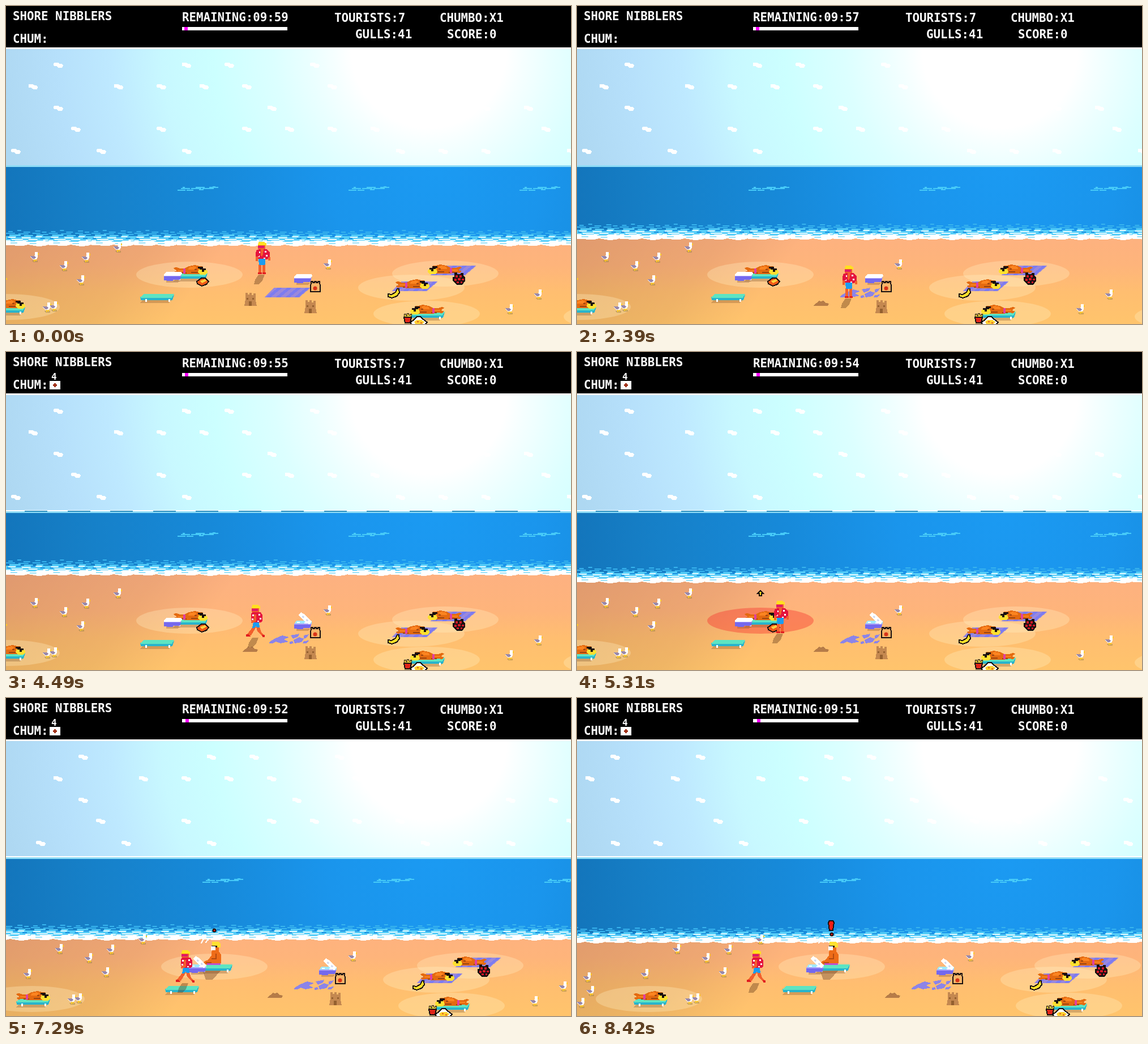
Recreate the animation shown at these times as an HTML page. Size 998 by 561 pixels, loop 8470 ms.

```html
<!DOCTYPE html>
<html lang="en">
<head>
<meta charset="utf-8">
<title>Shore game</title>
<style>
html, body { margin: 0; width: 100%; height: 100%; overflow: hidden; background: #000; }
svg { display: block; width: 100vw; height: 100vh; shape-rendering: crispEdges; }
text { font: bold 20.8px "DejaVu Sans Mono", monospace; fill: #fff; white-space: pre; }
.round { shape-rendering: auto; }
</style>
</head>
<body>
<svg viewBox="0 0 998 561">
<defs>
  <radialGradient id="skyFill" gradientUnits="userSpaceOnUse" cx="747" cy="78" r="760">
    <stop offset=".18" stop-color="#fff"/><stop offset=".22" stop-color="#f6ffff"/>
    <stop offset=".28" stop-color="#eaffff"/><stop offset=".36" stop-color="#dcffff"/>
    <stop offset=".5" stop-color="#cff"/><stop offset=".62" stop-color="#c8f8ff"/>
    <stop offset=".74" stop-color="#bee9ff"/><stop offset=".86" stop-color="#b6e0fb"/>
    <stop offset="1" stop-color="#aed8f2"/>
  </radialGradient>
  <radialGradient id="seaFill" gradientUnits="userSpaceOnUse" cx="760" cy="290" r="770">
    <stop offset="0" stop-color="#1b9af2"/><stop offset=".25" stop-color="#1a95ec"/>
    <stop offset=".5" stop-color="#178ada"/><stop offset=".8" stop-color="#1680c8"/>
    <stop offset="1" stop-color="#1375bb"/>
  </radialGradient>
  <linearGradient id="sandFill" gradientUnits="userSpaceOnUse" x1="0" y1="400" x2="0" y2="561">
    <stop offset="0" stop-color="#fdb180"/><stop offset=".35" stop-color="#feb47b"/>
    <stop offset=".65" stop-color="#ffbe70"/><stop offset="1" stop-color="#ffc46c"/>
  </linearGradient>
  <linearGradient id="shade" gradientUnits="userSpaceOnUse" x1="0" y1="410" x2="260" y2="600">
    <stop offset="0" stop-color="#200" stop-opacity=".13"/>
    <stop offset=".65" stop-color="#200" stop-opacity=".07"/>
    <stop offset="1" stop-color="#200" stop-opacity="0"/>
  </linearGradient>
  <pattern id="foamTile" patternUnits="userSpaceOnUse" width="75.5" height="32">
    <path fill="#38b4ee" d="M4 2h8v2H4zM20 0h7v2h-7zM31 3h12v2H31zM52 1h9v2h-9zM64 3h8v2h-8zM0 5h16v2H0zM22 6h18v2H22zM47 5h14v2H47zM66 7h9v2h-9z"/>
    <path fill="#55cdf8" d="M6 8h20v3H6zM32 9h16v2H32zM54 8h12v3H54zM0 11h75.5v12H0z"/>
    <path fill="#1b8fe0" d="M18 11h9v2h-9zM44 11h8v2h-8zM2 14h6v2H2zM61 14h8v2h-8z"/>
    <path fill="#e4faff" d="M4 12h13v2H4zM28 13h16v2H28zM53 11h11v2H53zM10 16h20v2H10zM40 16h16v2H40zM66 17h9v2h-9zM0 18h8v2H0zM30 18h9v2h-9z"/>
    <path fill="#fff" d="M0 20h14l4-1h14l5 2h14l5-2h12l4 1h3.5v6l-6 2-12 1-7-1-12-2-7 2H20l-8-1H0z"/>
    <path fill="#9be2f8" d="M8 22h12v2H8zM42 23h12v2H42z"/>
  </pattern>
  <path id="cloud" fill="#fff" d="M-7-5h7l3 2h3l3 3-2 4h-6l-4-3h-4l-1-3z"/>
  <path id="ripple" fill="#46caf8" d="M-36 2h14v2h-14zM-30-1h16v2h-16zM-27-3h4v2h-4zM-20 2h12v2h-12zM-12-1h18v2h-18zM-4-3h16v2H-4zM2 1h8v2H2zM8-1h20v2H8zM20-3h16v2H20zM26-4h5v1h-5z"/>
  <g id="gull">
    <path fill="#a88a48" opacity=".6" d="M-4 6h10v3H-2z"/>
    <path fill="#fff" d="M1-9h5v9l-2 4h-7l-4-5h5l3-3z"/>
    <path fill="#98a" d="M-7-2h8l2 3-3 2h-3z"/>
    <path fill="#fc2" d="M6-7h2v3H6zM-1 4h2v4h-2zM2 4h2v3H2z"/>
  </g>
  <g id="bed">
    <path fill="#8a5a30" opacity=".35" d="M-26 9h52l-6 5h-50z"/>
    <path fill="#28b4cc" d="M-30 3l60-3-3 9h-56z"/>
    <path fill="#5ee4c2" d="M-24-2h54l-4 7h-56z"/>
    <path fill="#fff" d="M-21 7h3v5h-3zM20 7h3v5h-3z"/>
  </g>
  <g id="towel">
    <path fill="#9a88dc" d="M-23-9h64l-20 17h-62z"/>
    <path fill="#7c7cf0" d="M-17-9h8l-21 17h-8zM0-9h8L-13 8h-8zM17-9h8L4 8h-8zM33-9h6L19 8h-7z"/>
  </g>
  <path id="rags" fill="#8c84e8" d="M-33 5l8-5 14-6 12 3-9 4 8 4-14 3-8-3-6 3h-6zM4-6l15-3-2 5-9 4zM9 2l10-5 8 3-4 6-12 2zM27-6l9-2-4 6-5 2zM27 4l9-1-5 5h-6zM2 5l5-1 2 4-7 1z"/>
  <g id="lying">
    <path fill="#e46a10" d="M-30-4l6-1 6 2h8l8-4 11-2 8 2h5v14h-30l-11-2-6 1-4-3 6-2z"/>
    <path fill="#fb8420" d="M-2-5l9-2 5 2-5 4H-3zM-22 0h12v2h-12z"/>
    <path fill="#9c4510" d="M2 3h12v2H2zM-16 4h10v2h-10zM8-2h4v2H8z"/>
    <path fill="#e040a0" d="M-12-3h4v9h-4z"/>
    <path fill="#ffe030" d="M16-2h12l3 4v3l-4 3h-9l-4-4z"/>
    <path fill="#181010" d="M14-6h9v3h5v3h-3v3h-4v-4h-4v-2h-3z"/>
  </g>
  <g id="sitting">
    <path fill="#6b3a18" opacity=".4" d="M-22 16h32l-14 16h-12z"/>
    <path fill="#ee6c18" d="M-5-25H7v7l4 6v15l-6 3h-20l-9-1 6-6 6-2 6-8z"/>
    <path fill="#b44a10" d="M1-14h2v10h-9v-2h7zM-16 1h10v2h-10z"/>
    <path fill="#c050d0" d="M-14 3h24v3h-24z"/>
    <path fill="#ffe030" d="M-5-35H6l4 4v6H-2l-3-5z"/>
    <path fill="#181010" d="M-6-28h10v3H-6z"/>
  </g>
  <g id="coolerBox">
    <path fill="#8a5a30" opacity=".35" d="M-12 7h26l-6 4h-20z"/>
    <path fill="#7468ee" d="M-16-2h31l-3 8H0v2h-11V7h-5z"/>
    <path fill="#a8a0fa" d="M-16-2h31l-2 2h-29z"/>
  </g>
  <path id="shut" fill="#fff" d="M-12-8h27l1 3-3 4h-29v-3z"/>
  <g id="open">
    <path fill="#9fe8ff" d="M-12-7h27v5h-30z"/>
    <path fill="#fff" d="M-9-17l5-5 5 3 14 13-3 5-6-1zM-11-5h5v2h-5zM2-4h6v2H2z"/>
    <path fill="#cfd8f0" d="M-3-14l3-2 2 3-2 1zM4-8l3-2 2 3-3 1z"/>
  </g>
  <g id="castle">
    <path fill="#c48850" d="M-8-12h4v3h3v-3h4v4h3v-3h4v12l2 10h-22l2-12z"/>
    <path fill="#94602f" d="M-2 3h5v8h-5zM-6-3h3v3h-3zM4-3h3v3H4z"/>
  </g>
  <path id="pile" fill="#b67c48" d="M-14 6l6-5 4-4 4 1 4-1 5 4 5 1-2 4z"/>
  <g id="snack" stroke="#181010" stroke-width="2">
    <path fill="#f05a18" d="M-10 0l8-6h7l6 6-4 5-8 3-8-4z"/>
    <path fill="#ffd040" d="M-5-1l9-3 3 3-8 4z" stroke="none"/>
  </g>
  <g id="berries">
    <path fill="#181010" d="M-8-11h5v3h6v-2h5v5l3 3v6l-5 7H-4l-7-7v-7h3z"/>
    <path fill="#d81828" d="M-6-6h4v4h-4zM1-6h4v4H1zM-8 0h4v4h-4zM-2-1h5v4h-5zM5 0h4v3H5zM-4 5h4v3h-4zM3 5h3v3H3z"/>
  </g>
  <path id="banana" fill="#ffe028" stroke="#181010" stroke-width="2" d="M6-8h3l1 7-5 6-8 3-7-2v-5l6 1 7-4z"/>
  <g id="fries">
    <path fill="#ffe040" stroke="#181010" d="M-6-8h3v3h2v-4h3v3h3v-2h3l-2 9H-5z"/>
    <path fill="#e02418" stroke="#181010" stroke-width="2" d="M-6-2H7L5 8H-4z"/>
  </g>
  <g id="pie">
    <path fill="#fff" stroke="#181010" stroke-width="2" d="M-15 2l8-7 4-4h6l4 4 8 6-6 6h-18z"/>
    <path fill="#ffd030" d="M-8 0l5-3H5l5 3-4 5H-5z"/>
    <path fill="#e06020" d="M-3-1h3v2h-3zM3 1h3v2H3z"/>
  </g>
  <g id="bag">
    <path fill="#f6b468" stroke="#181010" stroke-width="2" d="M-7-9h3v2h3v-2h3v2h3v-2h3v4l1 2V9H-8V-3l1-2z"/>
    <circle class="round" cy="3" r="3.5" fill="#d83418"/>
  </g>
  <g id="torso">
    <path fill="#5a3414" opacity=".38" d="M-7 1H4l-4 10-7 7h-8l2-8z"/>
    <path fill="#ffe020" d="M-7-57H4v2h3v5H-8z"/>
    <path fill="#f2602c" d="M-8-51H5v7H2v3h-7v-3h-3z"/>
    <path fill="#e01868" d="M-8-50H3v4H-8z"/>
    <path fill="#e4143e" d="M-7-44H8l3 5v10l-3 3H-7l-2-4v-11z"/>
    <path fill="#fff" d="M-7-40h3v3h-3zM4-41h3v3H4zM-8-33h3v3h-3zM6-34h3v3H6zM2-29h3v2H2z"/>
  </g>
  <g id="stand">
    <path fill="#f2602c" d="M-7-17h5V0h-5zM0-17h5V0H0zM-12-31h4v8h-4zM10-30h4v6h-4zM-3-44h5v3l-2 9h-3z"/>
    <path fill="#e4143e" d="M-10-43h4v12h-6v-7zM8-43l5 5v8H9z"/>
    <path fill="#1b9cf0" d="M-7-27H5v9l-2 2h-9z"/>
    <path fill="#e01c20" d="M-8-3h7v3h-7zM0-3h6v3H0z"/>
  </g>
  <g id="stride">
    <path fill="#f2602c" d="M-6-18h6L-9-3h-7v-2zM0-18h6l3 9 6 7h-5l-8-8zM-4-40h4v12l-6 3h-3v-3l5-3z"/>
    <path fill="#1b9cf0" d="M-5-26H5l1 9H1l-2-2-3 3h-3z"/>
    <path fill="#e01c20" d="M-18-5h5l3 4h-8zM10-4h5v4h-4z"/>
  </g>
</defs>

<rect y="76" width="998" height="206" fill="url(#skyFill)"/>
<g id="clouds"></g>
<rect y="283" width="998" height="160" fill="url(#seaFill)"/>
<rect y="281" width="998" height="3" fill="#8edcf6"/>
<rect id="crest" y="279" width="998" height="2" fill="#fff"/>
<g id="dashes" fill="#2c8fc0"></g>
<g id="ripples"></g>
<rect id="sand" width="998" height="200" fill="url(#sandFill)"/>
<rect id="sandShade" width="998" height="200" fill="url(#shade)"/>
<g id="foam"><rect x="-80" width="1160" height="32" fill="url(#foamTile)"/></g>
<g id="world"></g>

<rect width="998" height="76" fill="#fff"/>
<rect width="998" height="73"/>
<text x="12" y="25">SHORE NIBBLERS</text>
<text x="12" y="65">CHUM:</text>
<text id="clock" x="311" y="27"></text>
<text x="580" y="28">TOURISTS:7</text>
<text x="617" y="57">GULLS:41</text>
<text x="766" y="28">CHUMBO:X1</text>
<text x="779" y="57">SCORE:0</text>
<rect x="311" y="37" width="186" height="6" fill="#fff"/>
<rect id="mark" y="37" width="6" height="6" fill="#f0f"/>
<g id="stock">
  <text x="80" y="49" style="font-size:16px">4</text>
  <path fill="#fff" d="M77 51h19v15H77z"/>
  <path fill="#a03018" d="M83 57h7v3h-7zM85 55h3v7h-3z"/>
</g>
</svg>

<script>
const LOOP = 8470, TILE = 75.5;
const $ = id => document.getElementById(id);
const put = (id, x, y, flip = 1, name = '') =>
  `<use href="#${id}" transform="translate(${x} ${y}) scale(${flip} 1)"${name && ` id="${name}"`}/>`;
const spots = (id, list) => list.map(([x, y]) => put(id, x, y)).join('');
const glow = (x, y, name = '') =>
  `<ellipse class="round" cx="${x}" cy="${y}" rx="94" ry="23" fill="#fff0c8" fill-opacity=".3"${name && ` id="${name}"`}/>`;

// Clouds sit on a grid: first x, y, then column numbers
const cloudRows = [
  [92, 105, [-2, 0, 3, 4, 6]],
  [47.5, 143, [-2, 0, 2, 3, 4, 5, 7, 10]],
  [92, 181, [-2, 0, 5, 10, 11]],
  [123, 218, [0, 2, 4, 5, 6, 7, 11]],
  [17, 257, [-1, 0, 2, 4, 9, 10, 11, 13]]
];
$('clouds').innerHTML = cloudRows.map(([x, y, cols]) =>
  spots('cloud', cols.map(c => [x + c * TILE, y]))).join('');
$('ripples').innerHTML = spots('ripple', [[339, 322], [641, 322], [943, 322]]);
$('dashes').innerHTML = Array.from({ length: 15 }, (_, i) =>
  `<rect x="${33 + (i - 1) * TILE}" y="280" width="40" height="2"/>`).join('');

$('world').innerHTML =
  glow(324, 474, 'alert') + glow(1, 531) + glow(776, 472) + glow(716, 497) + glow(743, 543) + glow(1079, 548) +
  spots('gull', [[50, 443], [102, 459], [141, 444], [197, 426], [132, 484], [84, 530], [72, 532], [568, 456],
    [940, 509], [889, 535], [-6, 487], [-108, 493], [-102, 517], [-119, 538]]) +
  put('bed', 267, 510) + put('bed', 4, 532) + put('lying', 3, 526) +
  put('bed', 326, 472) + put('lying', 325, 466, 1, 'sleeper') + put('sitting', 325, 465, 1, 'awake') +
  put('coolerBox', 295, 477) + put('shut', 295, 477, 1, 'shutA') + put('open', 295, 477, 1, 'openA') +
  put('snack', 347, 486, 1, 'meal') +
  put('towel', 497, 506, 1, 'neat') + put('rags', 499, 506, 1, 'torn') +
  put('coolerBox', 525, 481) + put('shut', 525, 481, 1, 'shutB') + put('open', 525, 481, 1, 'openB') +
  put('towel', 790, 467) + put('lying', 776, 465, -1) + put('berries', 800, 481) +
  put('towel', 722, 495) + put('lying', 717, 491) + put('banana', 685, 507) +
  put('bed', 745, 541) + put('lying', 745, 536, -1) + put('fries', 709, 551) + put('pie', 729, 557) +
  put('castle', 431, 518, 1, 'fort') + put('pile', 431, 523, 1, 'ruin') + put('castle', 537, 531) +
  `<g id="hero">${put('torso', 0, 0) + put('stand', 0, 0, 1, 'still') + put('stride', 0, 0, 1, 'moving')}</g>` +
  put('bag', 546, 495) +
  `<path id="arrow" fill="#ffe020" stroke="#181010" stroke-width="2" d="M0-5l5 5H2v4h-4V0h-3z"/>
  <g id="ask" transform="translate(325 402)">
    <path d="M-5-2v-4l3-2h5l3 3v4L0 4v4" fill="none" stroke="#181010" stroke-width="6"/>
    <path d="M-5-3v-3l3-2h5l3 3v4L0 4v3" fill="none" stroke="#f06a18" stroke-width="3"/>
    <path d="M-2 13h5v4h-5z" fill="#f06a18" stroke="#181010" stroke-width="2"/>
  </g>
  <g id="shout" fill="#f01c14" stroke="#181010" stroke-width="2">
    <path id="bar" d="M-3-18h6l2 3-2 14h-6l-2-14z"/>
    <circle id="dot" class="round" r="2.5"/>
  </g>
  <g id="sniff" fill="none" stroke="#fff" stroke-width="2">
    <path d="M301 433q2-7 8-10M309 432q1-4 5-6"/>
    <path fill="#fff" d="M319 439h6v5h-6z"/>
  </g>`;

// Linear path through [time, value...] points
function along(keys, t) {
  let i = 1;
  while (i < keys.length - 1 && keys[i][0] < t) i++;
  const a = keys[i - 1], b = keys[i];
  const k = Math.min(1, Math.max(0, (t - a[0]) / (b[0] - a[0])));
  return a.slice(1).map((v, n) => v + (b[n + 1] - v) * k);
}
const tide = [[0, 421], [870, 424], [1300, 424], [1820, 419], [2390, 410], [3680, 393], [4300, 389],
  [5310, 405], [6060, 423], [6870, 425], [7290, 425], [8420, 430]];
const walk = [[250, 453, 473], [850, 438, 522], [1300, 438, 522], [1800, 481, 515], [2450, 481, 515],
  [2920, 526, 510], [3660, 527, 510], [5290, 360, 496], [6430, 360, 496], [6870, 316, 496],
  [7290, 274, 502], [8470, 188, 502]];

const show = (id, on) => { $(id).style.display = on ? '' : 'none'; };
const swap = (before, after, done) => { show(before, !done); show(after, done); };
const move = (id, x, y, extra = '') => $(id).setAttribute('transform', `translate(${x} ${y}) ${extra}`);
const attrs = (id, set) => Object.entries(set).forEach(([k, v]) => $(id).setAttribute(k, v));

function draw(t) {
  const [x, y] = along(walk, t);
  const ahead = along(walk, t + 10)[0] - x;
  const cam = Math.round(Math.max(0, 318 - x));
  const sea = Math.round(along(tide, t)[0]);

  for (const id of ['clouds', 'ripples', 'dashes', 'world']) move(id, cam, 0);
  move('foam', cam % TILE, sea - 26);
  attrs('sand', { y: sea - 4 });
  attrs('sandShade', { y: sea - 4 });
  show('crest', t > 3050);
  show('dashes', t > 3050 && t < 6250);

  const step = Math.cos(Math.PI * (t - 6870) / 139) ** 2 > .45;
  const going = Math.abs(ahead) > .05;
  move('hero', Math.round(x), Math.round(y), `scale(${ahead > .05 ? -1 : 1} 1)`);
  swap('still', 'moving', going && step);

  swap('fort', 'ruin', t >= 900);
  swap('neat', 'torn', t >= 1980);
  swap('shutB', 'openB', t >= 3720);
  show('stock', t >= 3720);
  swap('shutA', 'openA', t >= 7050);
  swap('sleeper', 'awake', t >= 5700);
  show('meal', t < 5700);

  const near = t >= 4750 && t < 5640, wide = t >= 5640 && t < 7240;
  const grow = wide ? Math.min(1, (t - 5640) / 260) : 0;
  attrs('alert', {
    rx: 94 + 220 * grow, ry: 23 + 56 * grow,
    fill: near ? '#f4302c' : wide ? '#f0d020' : '#fff0c8',
    'fill-opacity': near ? .4 : wide ? .42 : .3
  });
  show('arrow', near);
  move('arrow', 324, 426 + Math.round(3 * Math.sin((t - 5310) / 120)));
  show('ask', t >= 5750 && t < 7220);
  show('shout', t >= 7240);
  show('sniff', t >= 7240);
  const pop = Math.min(1, Math.max(0, (t - 7320) / 200));
  move('dot', 324, 410 + 7 * pop);
  move('bar', 323, 411, `scale(1 ${pop})`);
  show('bar', pop > 0);

  $('clock').textContent = 'REMAINING:09:' + (59 - Math.floor((t + 450) / 1000));
  attrs('mark', { x: 315 + 2.6 * t / LOOP });
}

const start = performance.now();
function tick() {
  draw((performance.now() - start) % LOOP);
  requestAnimationFrame(tick);
}
tick();
</script>
</body>
</html>
```
